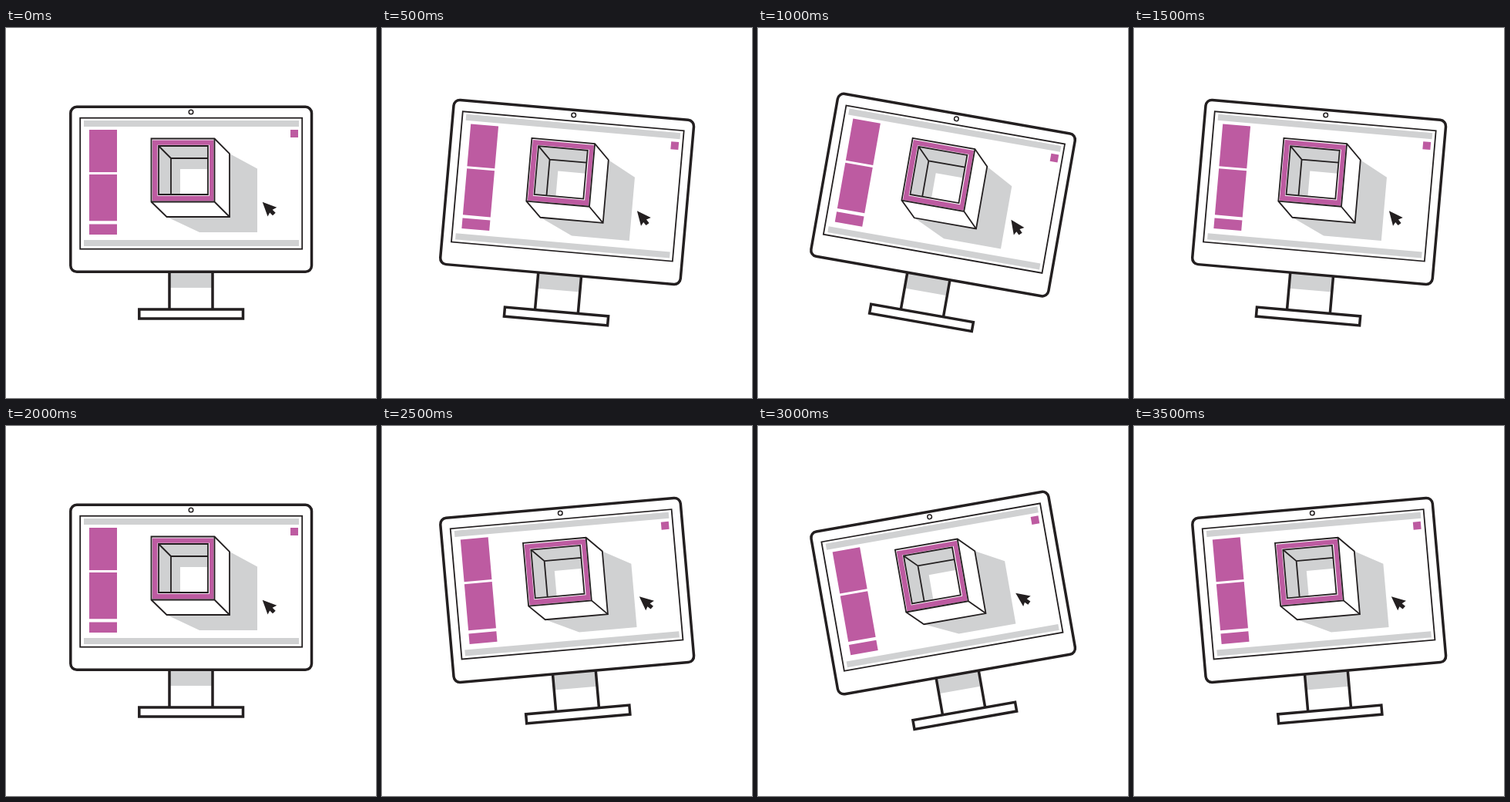
Animation of 480x480 px, one loop 4 s. Source, as an HTML page:

```html
<!DOCTYPE html>
<html lang="en">
<head>
<meta charset="utf-8">
<title>Rocking monitor</title>
<style>
  html, body { margin: 0; width: 100%; height: 100%; overflow: hidden; background: #fff; }
  svg { display: block; width: 100vw; height: 100vh; }
  .line { fill: none; stroke: #231f20; stroke-linejoin: miter; }
  .bold { stroke-width: 3.5; }
  .thin { stroke-width: 1.8; }
  .white { fill: #fff; }
  .grey { fill: #d0d1d2; }
  .pink { fill: #bd5ba1; }
</style>
</head>
<body>
<svg viewBox="0 0 480 480">
  <g id="monitor">
    <!-- stand -->
    <path class="grey" d="M212 317H268V337H212Z"/>
    <path class="line bold" d="M212 316V365M268 316V365"/>
    <rect class="line bold" x="172.8" y="365" width="134.7" height="12"/>

    <!-- case and screen -->
    <rect class="line bold white" x="83.8" y="102.3" width="312.7" height="214" rx="8"/>
    <circle class="line" cx="240" cy="109" r="2.8" stroke-width="1.5"/>
    <rect class="line thin" x="96.2" y="116.7" width="288" height="170"/>
    <path class="grey" d="M101 120H380V128H101ZM101 275H380V283H101Z"/>
    <path class="pink" d="M108 132H144V187H108ZM108 190H144V250.3H108ZM108 254.5H144V268H108ZM369 132H379V142H369Z"/>

    <!-- hollow cube -->
    <path class="grey" d="M290 163L326 182.5V265H251L208.5 245H290Z"/>
    <path class="line thin white" d="M188.5 143.5H270.5L290 163V245H208.5L188.5 225.5Z"/>
    <path class="pink" d="M190 145.5H269.5V224.5H190Z"/>
    <path class="white" d="M196.5 151.7H264V217.8H196.5Z"/>
    <path class="grey" d="M198 153H262V183H226V216H198Z"/>
    <path class="line thin" d="M188.5 225.5H270.5V143.5M270.5 225.5L290 245M198 153H262V216H198ZL214 169H262M214 169V216"/>

    <!-- pointer -->
    <path fill="#231f20" d="M332.7 225.7L351.3 232.8L345.7 235.8L349.7 239.8L346 243.3L342.2 239.6L339.5 244.5Z"/>
  </g>
</svg>
<script>
  const STEP = 500;
  const ANGLES = [0, 5, 10, 5, 0, -5, -10, -5];
  const monitor = document.getElementById("monitor");

  function draw() {
    const angle = ANGLES[Math.floor(performance.now() / STEP) % ANGLES.length];
    const drop = Math.abs(angle) * 0.73;
    monitor.setAttribute("transform", `translate(0 ${drop}) rotate(${angle} 240 209)`);
    requestAnimationFrame(draw);
  }
  draw();
</script>
</body>
</html>
```
